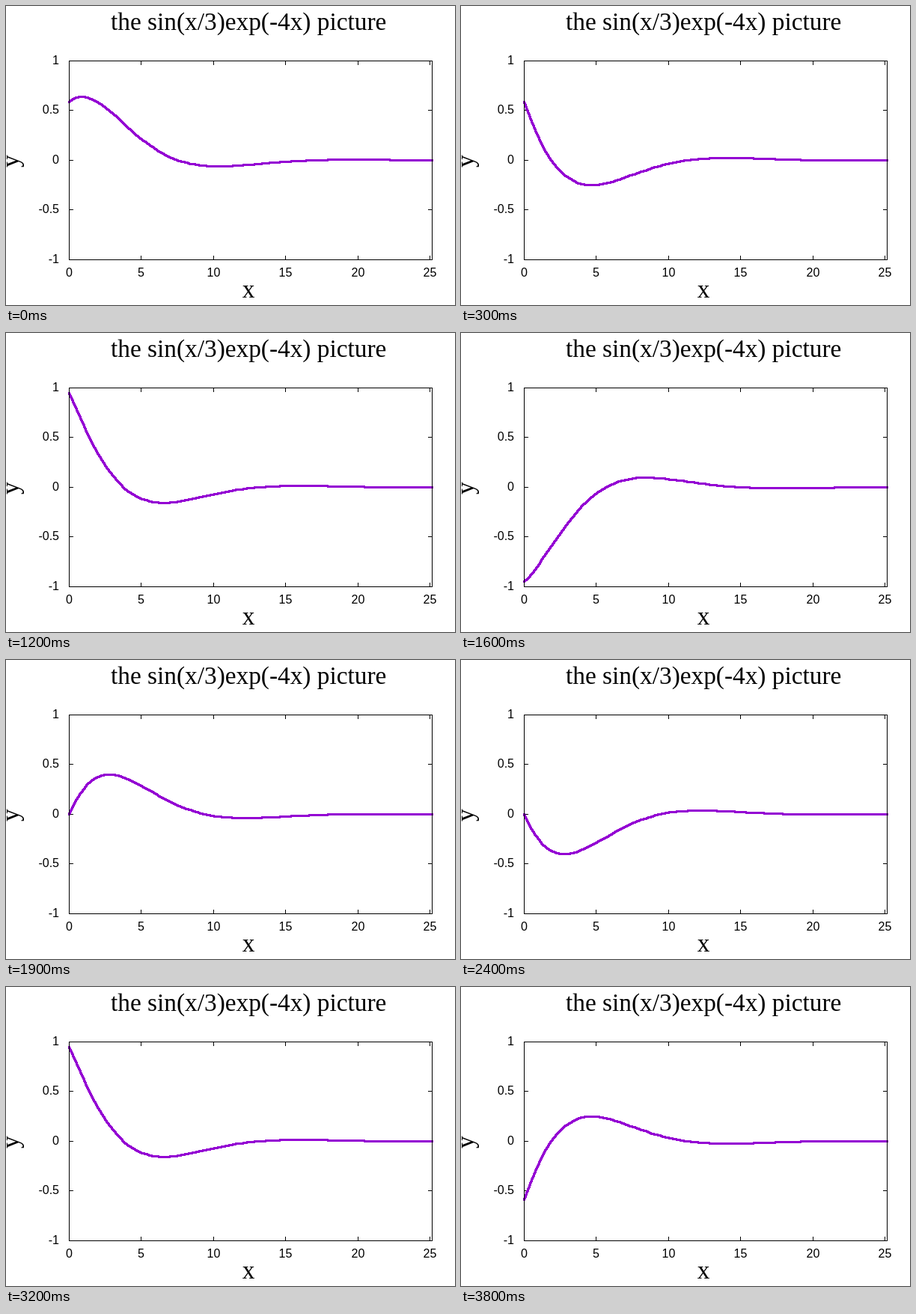
Animation of 600 by 400 pixels, one loop 3.9 s. Source, as an HTML page with a canvas:

```html
<!DOCTYPE html>
<html lang="en">
<head>
<meta charset="utf-8">
<title>Damped sine</title>
<style>
  html, body { margin: 0; width: 100%; height: 100%; overflow: hidden; background: #fff; }
  canvas, svg { position: absolute; left: 0; top: 0; width: 600px; height: 400px; }
  text { font: 16px "Liberation Sans", Arial, sans-serif; fill: #000; }
  .big { font: 33.33px "Liberation Serif", "Times New Roman", serif; }
</style>
</head>
<body>
<canvas id="plot" width="600" height="400"></canvas>
<svg id="labels" viewBox="0 0 600 400">
  <text class="big" x="140" y="32">the sin(x/3)exp(-4x) picture</text>
  <text class="big" x="324" y="390" text-anchor="middle">x</text>
  <text class="big" transform="translate(17 216) rotate(-90)">y</text>
</svg>
<script>
const LEFT = 84, RIGHT = 569, TOP = 73, BOTTOM = 339;
const X_MAX = 8 * Math.PI, SAMPLES = 100, TICK = 6;
const STEP_MS = 100, STEPS = 39;
const X_TICKS = [0, 5, 10, 15, 20, 25], Y_TICKS = [-1, -0.5, 0, 0.5, 1];

const ctx = document.getElementById('plot').getContext('2d');
const labels = document.getElementById('labels');

const px = x => Math.floor(LEFT + x / X_MAX * (RIGHT - LEFT) + 0.5);
const py = y => BOTTOM - Math.floor((y + 1) / 2 * (BOTTOM - TOP) + 0.5);

function addLabel(text, x, y, anchor) {
  const el = document.createElementNS(labels.namespaceURI, 'text');
  el.setAttribute('x', x);
  el.setAttribute('y', y);
  el.setAttribute('text-anchor', anchor);
  el.textContent = text;
  labels.append(el);
}

function drawTicks() {
  ctx.fillStyle = '#000';
  for (const v of X_TICKS) {
    ctx.fillRect(px(v), TOP, 1, TICK);
    ctx.fillRect(px(v), BOTTOM - TICK + 1, 1, TICK);
  }
  for (const v of Y_TICKS) {
    ctx.fillRect(LEFT, py(v), TICK, 1);
    ctx.fillRect(RIGHT - TICK + 1, py(v), TICK, 1);
  }
}

// Hard-edged line swept with a 3px square brush
function brushLine(x0, y0, x1, y1) {
  const n = Math.max(Math.abs(x1 - x0), Math.abs(y1 - y0));
  for (let i = 0; i <= n; i++) {
    const x = Math.round(x0 + (x1 - x0) * i / n);
    const y = Math.round(y0 + (y1 - y0) * i / n);
    ctx.fillRect(x - 1, y - 1, 3, 3);
  }
}

function drawCurve(phase) {
  ctx.fillStyle = '#9400d3';
  let last;
  for (let i = 0; i < SAMPLES; i++) {
    const x = X_MAX * i / (SAMPLES - 1);
    const point = [px(x), py(Math.sin(x / 3 + phase) * Math.exp(-x / 4))];
    if (last) brushLine(...last, ...point);
    last = point;
  }
}

function draw(step) {
  ctx.clearRect(0, 0, 600, 400);
  drawTicks();
  drawCurve((step + 1) * Math.PI / 5);
  ctx.strokeStyle = '#000';
  ctx.strokeRect(LEFT + 0.5, TOP + 0.5, RIGHT - LEFT, BOTTOM - TOP);
}

for (const v of X_TICKS) addLabel(v, px(v) + 0.5, 362, 'middle');
for (const v of Y_TICKS) addLabel(v, 71, py(v) + 5, 'end');

const start = performance.now();
let shown = 0;
function tick() {
  const step = Math.floor((performance.now() - start) / STEP_MS) % STEPS;
  if (step !== shown) draw(shown = step);
  requestAnimationFrame(tick);
}
draw(0);
requestAnimationFrame(tick);
</script>
</body>
</html>
```
